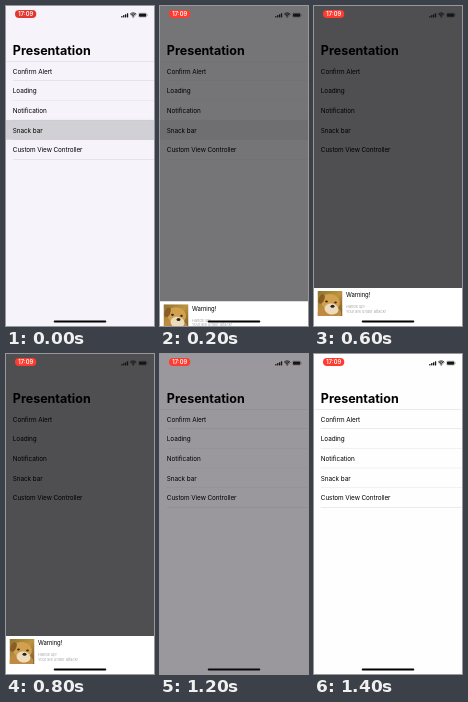
An HTML page with a canvas for the animation above (1500 ms loop, 148 px wide and 320 px high).

```html
<!DOCTYPE html>
<html lang="en">
<head>
<meta charset="utf-8">
<title>Presentation</title>
<style>
html, body { margin: 0; width: 100%; height: 100%; overflow: hidden; background: #fff; }
canvas { display: block; width: 148px; height: 320px; }
</style>
</head>
<body>
<canvas id="stage"></canvas>
<script>
const W = 148, H = 320, LOOP = 1500, TICK = 100;
const canvas = document.getElementById('stage');
const ctx = canvas.getContext('2d');
const dpr = window.devicePixelRatio || 1;
canvas.width = W * dpr;
canvas.height = H * dpr;

const ROWS = ['Confirm Alert', 'Loading', 'Notification', 'Snack bar', 'Custom View Controller'];
const LIST_TOP = 55, ROW_HEIGHT = 19.7, BAR_TOP = 282;

// Each track lists [time, value] pairs.
const BRIGHTNESS = [[0, 244], [100, 193], [200, 116], [300, 78], [1000, 78], [1100, 92], [1200, 152], [1300, 219], [1400, 254]];
const TINT = [[0, 1], [1200, 1], [1400, 0]];
const SELECTION = [[0, .15], [100, .125], [200, .05], [300, 0]];
const SEPARATOR = [[0, .09], [100, .08], [300, 0], [1000, 0], [1100, .06], [1400, .1]];
const BAR_SHOWN = [[100, 0], [200, .65], [300, 1], [900, 1], [1000, .6], [1100, 0]];
const INDICATOR = [[0, 0], [1000, 0], [1100, 58], [1200, 10], [1300, 0]];

function sample(track, t) {
  if (t <= track[0][0]) return track[0][1];
  for (let i = 1; i < track.length; i++) {
    const [t0, a] = track[i - 1], [t1, b] = track[i];
    if (t <= t1) return a + (b - a) * (t - t0) / (t1 - t0);
  }
  return track[track.length - 1][1];
}

function text(str, x, y, size, { weight = 400, color = '#000', spacing = 0, align = 'left' } = {}) {
  ctx.font = `${weight} ${size}px Inter, sans-serif`;
  ctx.letterSpacing = spacing + 'px';
  ctx.textAlign = align;
  ctx.fillStyle = color;
  ctx.fillText(str, x, y);
}

function rect(x, y, w, h, color, radius = 0) {
  ctx.fillStyle = color;
  ctx.beginPath();
  ctx.roundRect(x, y, w, h, radius);
  ctx.fill();
}

function ellipse(x, y, rx, ry, color, angle = 0) {
  ctx.fillStyle = color;
  ctx.beginPath();
  ctx.ellipse(x, y, rx, ry, angle, 0, Math.PI * 2);
  ctx.fill();
}

function drawStatusBar(t) {
  rect(9, 3.9, 21.3, 8.2, t < TICK ? '#e2382f' : '#ff3b30', 4.1);
  text('17:09', 19.7, 10.1, 5.7, { weight: 600, color: '#fff', align: 'center' });

  const ink = '#151416';
  for (let i = 0; i < 4; i++) {
    const h = 1.4 + i * .9;
    rect(115.2 + i * 1.9, 11.4 - h, 1.3, h, ink, .3);
  }

  ctx.strokeStyle = ink;
  ctx.lineWidth = .9;
  for (const r of [1.8, 3.2, 4.4]) {
    ctx.beginPath();
    ctx.arc(127.2, 11.3, r, -Math.PI * .75, -Math.PI * .25);
    ctx.stroke();
  }
  ellipse(127.2, 10.9, .7, .7, ink);

  ctx.globalAlpha = .4;
  ctx.lineWidth = .4;
  ctx.beginPath();
  ctx.roundRect(132.4, 7, 8.4, 4.4, 1.3);
  ctx.stroke();
  rect(141.2, 8.5, .5, 1.4, ink, .2);
  ctx.globalAlpha = 1;
  rect(133, 7.6, 7.2, 3.2, ink, .7);
}

function drawList(t) {
  text('Presentation', 6.8, 49.2, 12.5, { weight: 700 });
  const selection = sample(SELECTION, t);
  rect(0, LIST_TOP + 3 * ROW_HEIGHT, W, ROW_HEIGHT, `rgba(0,0,0,${selection})`);

  const line = `rgba(0,0,0,${sample(SEPARATOR, t)})`;
  rect(0, LIST_TOP, W, .8, line);
  ROWS.forEach((label, i) => {
    const y = LIST_TOP + i * ROW_HEIGHT;
    text(label, 6.8, y + 12.6, 6.4, { spacing: -.08 });
    rect(6.8, y + ROW_HEIGHT - .4, W - 6.8, .6, line);
  });
}

function drawDog(x, y, size) {
  ctx.save();
  ctx.translate(x, y);
  ctx.beginPath();
  ctx.rect(0, 0, size, size);
  ctx.clip();
  const ground = ctx.createLinearGradient(0, 0, size, size);
  ground.addColorStop(0, '#8d7430');
  ground.addColorStop(.5, '#bd9440');
  ground.addColorStop(1, '#735326');
  rect(0, 0, size, size, ground);
  ellipse(12, 23, 12, 8, '#c08a42');
  ellipse(13, 11, 9.5, 8, '#d2a150', .25);
  ellipse(4, 8, 2.8, 5, '#8a5d26', .4);
  ellipse(14, 18, 7, 5.5, '#ecdcbc', .2);
  ellipse(9, 10.5, 1.4, 1.1, '#3a2817');
  ellipse(18, 11.5, 1.3, 1.1, '#3a2817');
  ellipse(15, 15.2, 2, 1.5, '#2b201c');
  ctx.restore();
}

function drawSnackBar(t) {
  const shown = sample(BAR_SHOWN, t);
  if (!shown) return;
  ctx.save();
  ctx.translate(0, (1 - shown) * (H - BAR_TOP));
  rect(0, BAR_TOP, W, H - BAR_TOP, '#fff');
  drawDog(3.5, 285, 25);
  text('Warning!', 32, 291.4, 5.9, { spacing: -.07 });
  text('Hands up!', 32, 302.2, 3.9, { color: '#aaa' });
  text('Your are under attack!', 32, 306.9, 3.9, { color: '#aaa', spacing: -.04 });
  ctx.restore();
}

function draw(t) {
  ctx.setTransform(dpr, 0, 0, dpr, 0, 0);
  const level = sample(BRIGHTNESS, t), tint = sample(TINT, t);
  const channels = [.01, 0, .025].map(gain => level * (1 + gain * tint));
  rect(0, 0, W, H, `rgb(${channels})`);
  drawList(t);
  drawSnackBar(t);
  drawStatusBar(t);
  const ink = sample(INDICATOR, t);
  rect(47.7, 314.5, 52.6, 2, `rgb(${ink},${ink},${ink})`, 1);
}

function frame() {
  const t = performance.now() % LOOP;
  draw(Math.floor(t / TICK) * TICK);
  requestAnimationFrame(frame);
}
frame();
</script>
</body>
</html>
```
